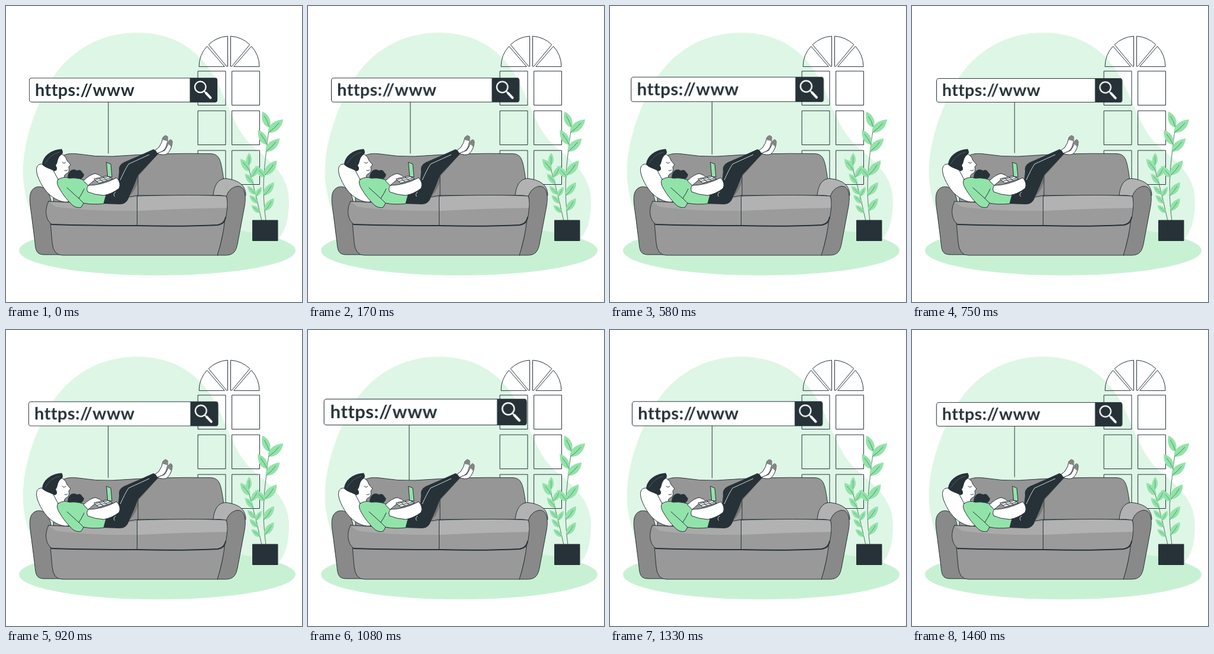
These frames come from a looping animation (500x500 px, 1500 ms). An HTML page without scripts:

```html
<!DOCTYPE html>
<html lang="en">
<head>
<meta charset="utf-8">
<title>Browsing on the sofa</title>
<style>
  html, body { margin: 0; width: 100%; height: 100%; overflow: hidden; background: #fff; }
  svg { display: block; width: 100%; height: 100%; }
  .ink { stroke: #263238; stroke-width: 1; stroke-linejoin: round; stroke-linecap: round; }
  .line { fill: none; }
  .dark { fill: #263238; }
  .white { fill: #fff; }
  .green { fill: #92e3a9; }
  .bar { transform-origin: 198px 185px; animation: beat 1.5s infinite; }
  .bar text {
    font: 700 28.5px Lato, sans-serif;
    font-variant-ligatures: none;
    letter-spacing: .4px;
    fill: #263238;
  }
  @keyframes beat {
    0% { transform: scale(1.014); animation-timing-function: ease-out; }
    4%, 52% { transform: scale(1); animation-timing-function: cubic-bezier(.55, 0, .75, 1); }
    27%, 75% { transform: scale(1.1); animation-timing-function: cubic-bezier(.25, 0, .45, 1); }
    100% { transform: scale(1); }
  }
</style>
</head>
<body>
<svg viewBox="0 0 500 500">
  <defs>
    <rect id="pane" width="46.500" height="57.500"/>
    <g id="arch">
      <path d="M326 102A51 51 0 0 1 339.500 68L369 102Z"/>
      <path d="M342.500 65A51 51 0 0 1 374.500 51V102H373Z"/>
    </g>
    <g id="leaf">
      <path class="green" d="M0 0C-9-4-11-16-4-29C4-22 8-10 0 0Z"/>
      <path d="M0 0Q0-11-3-21" fill="none" stroke="#477b59" stroke-width=".7"/>
    </g>
  </defs>

  <!-- Backdrop -->
  <path fill="#def6e6" d="M220 45C277 45 319 68 347 112C372 151 382 207 419 239C452 266 479 290 478 332C477 366 472 390 440 410H75C53 384 36 344 30 302C24 254 39 190 75 128C104 78 158 45 220 45Z"/>
  <ellipse cx="255.500" cy="413" rx="233.500" ry="42" fill="#c8f1d4"/>

  <!-- Window -->
  <g class="ink line">
    <use href="#arch"/>
    <use href="#arch" transform="translate(753) scale(-1 1)" x="-1"/>
    <use href="#pane" x="324.500" y="110"/><use href="#pane" x="382" y="110"/>
    <use href="#pane" x="324.500" y="177"/><use href="#pane" x="382" y="177"/>
    <use href="#pane" x="324.500" y="244"/><use href="#pane" x="382" y="244"/>
  </g>

  <!-- Plant -->
  <g fill="none" stroke="#477b59">
    <path d="M439 363C434 325 434 295 438 260S442 220 446 203"/>
    <path d="M432 363Q425 330 417 300T407 266"/>
  </g>
  <use href="#leaf" transform="translate(445 205) rotate(-16)"/>
  <use href="#leaf" transform="translate(443 214) rotate(56) scale(1.15)"/>
  <use href="#leaf" transform="translate(441 234) rotate(-24)"/>
  <use href="#leaf" transform="translate(439 246) rotate(54) scale(1.1)"/>
  <use href="#leaf" transform="translate(437 286) rotate(47) scale(1.1)"/>
  <use href="#leaf" transform="translate(437 289) rotate(-33) scale(.85)"/>
  <use href="#leaf" transform="translate(436 320) rotate(45) scale(.95)"/>
  <use href="#leaf" transform="translate(437 346) rotate(44) scale(.9)"/>
  <use href="#leaf" transform="translate(410 270) rotate(10) scale(.75)"/>
  <use href="#leaf" transform="translate(412 279) rotate(-30) scale(.9)"/>
  <use href="#leaf" transform="translate(415 289) rotate(40) scale(.8)"/>
  <use href="#leaf" transform="translate(418 300) rotate(-33) scale(.75)"/>
  <use href="#leaf" transform="translate(421 318) rotate(-36) scale(.65)"/>
  <use href="#leaf" transform="translate(422 322) rotate(38) scale(.65)"/>
  <use href="#leaf" transform="translate(425 333) rotate(-38) scale(.65)"/>
  <use href="#leaf" transform="translate(429 349) rotate(-42) scale(.65)"/>
  <rect class="dark" x="416" y="361.500" width="43.500" height="35.500" rx="1"/>

  <!-- Search bar -->
  <g class="bar">
    <path class="ink" d="M173.200 162.500V248"/>
    <rect class="white ink" x="41.500" y="122.500" width="313" height="40" rx="4"/>
    <path class="dark" d="M309 122H351Q355 122 355 126V159Q355 163 351 163H309Z"/>
    <text x="51" y="152">https://www</text>
    <g fill="none" stroke="#fff">
      <circle cx="326.500" cy="137.500" r="9.200" stroke-width="2.300"/>
      <path d="M333 144.500L336 147.500" stroke-width="2"/>
      <path d="M336 147.500L343.500 155.500" stroke-width="4" stroke-linecap="round"/>
    </g>
  </g>

  <!-- Sofa -->
  <g class="ink">
    <path fill="#969696" d="M80 335V280C85 254 98 247 122 250Q152 255 180 254Q262 248 345 249.500C361 250 363 259 368 295L352 326Z"/>
    <path fill="#b2b2b2" d="M350 321C351 304 358 291 372 291.500C392 294 405 302 405 320L374 332Z"/>
    <path fill="#898989" d="M77 335C75 314 64 302 51 306C40 310 39 322 41 337L49 400C50 415 53 420 65 420H95L82 360Z"/>
    <path fill="#999" d="M75 366L78 400Q80 421 95 421H358L371 366Z"/>
    <path fill="#898989" d="M372 335C369 318 379 306 391 304.500C404 304 406 321 403 338L391 402C388 417 382 421 370 421H357Q367 391 370 358Z"/>
    <path fill="#9b9b9b" d="M72 330C65 342 66 362 78 369Q145 371 221 371Q297 373 356 370Q370 368 372 354Q375 335 373 323Q369 319 352 320H222Q145 336 72 330Z"/>
  </g>
  <path fill="#b2b2b2" d="M222 321Q305 318 371 321Q374 328 373 341Q300 342 222 346Z"/>
  <path fill="#aaa" d="M72 331L112 333L221 323V346Q140 347 84 339Z"/>
  <path fill="#777" d="M256 250Q239 271 223 288V297Q217 314 208 322L187 332L211 286Z"/>
  <g class="ink line">
    <path d="M221.500 321V371M223 280V321M222 321Q320 318 372 321"/>
    <path d="M77 369Q145 371 221 371Q297 373 358 370Q369 368 371 357" stroke-width="2"/>
  </g>

  <!-- Pillow and head -->
  <path class="white ink" d="M62 267C51 266 50 275 53 286C59 303 70 319 84 326Q95 332 104 331Q115 328 110 315L88 278Z"/>
  <path class="dark" d="M104 291C104 279 112 273 120 278C128 274 129 284 132 284Q131 293 121 293Z"/>
  <path class="white ink" d="M91 249Q100 251 103 261L109 268L106 272Q108 280 103 283Q97 285 99 291L88 293L80 278Z"/>
  <path class="dark" d="M61 268C62 254 75 243 94 241.500Q98 247 94 251C86 256 88 266 84 269Q89 277 82 279C75 275 67 274 61 268Z"/>
  <path class="ink line" d="M95 264Q98 267 101 264M99 278Q102 279 104 277"/>
  <path class="ink line" d="M66 266Q75 250 90 247" style="stroke:#7c8589;stroke-width:.5"/>

  <!-- Legs and feet -->
  <path class="white ink" d="M250 245L258 239Q264 231 265 222Q269 217 273 221Q274 229 270 239Q265 248 254 249Z"/>
  <path class="white ink" d="M255 249L268 244Q274 236 275 228Q280 223 281 230Q280 242 272 250Q265 253 255 249Z"/>
  <path fill="#858585" d="M264 226Q265 219 270 218Q275 222 272 228ZM274 233L275 227Q280 223 281 230Q281 234 279 238Z"/>
  <path class="dark" d="M162 334L169 318L188 307L191 280Q189 269 199 264Q225 253 249 242Q255 244 256 251L223 286Q216 305 208 322Q204 335 192 335Z"/>
  <path d="M242 251L207 267Q201 276 193 294M185 314Q180 319 184 322" fill="none" stroke="#fff" stroke-width=".8"/>

  <!-- Body and laptop -->
  <path class="green ink" d="M88 293Q98 287 107 291Q124 289 138 297L142 310L169 319L165 334Q145 336 131 333L127 340Q120 342 113 337Q99 324 90 308Q84 298 88 293Z"/>
  <path class="ink line" d="M103 307L123 325Q129 316 132 309M123 325L131 333"/>
  <path class="white ink" d="M139 303Q162 303 187 290Q195 299 191 308Q180 317 165 320Q150 319 138 314Q135 308 139 303Z"/>
  <path class="white ink" d="M131 295Q142 284 151 283Q159 285 164 291L153 291L139 303Z"/>
  <path class="white ink" d="M149 292L170 287L180 292L157 299Z"/>
  <path class="ink line" d="M152 293L171 289M154 296L176 291M157 291L164 297M164 289L171 295"/>
  <path class="green ink" d="M170 264L177 267L179 289L172 288Z"/>
</svg>
</body>
</html>
```
